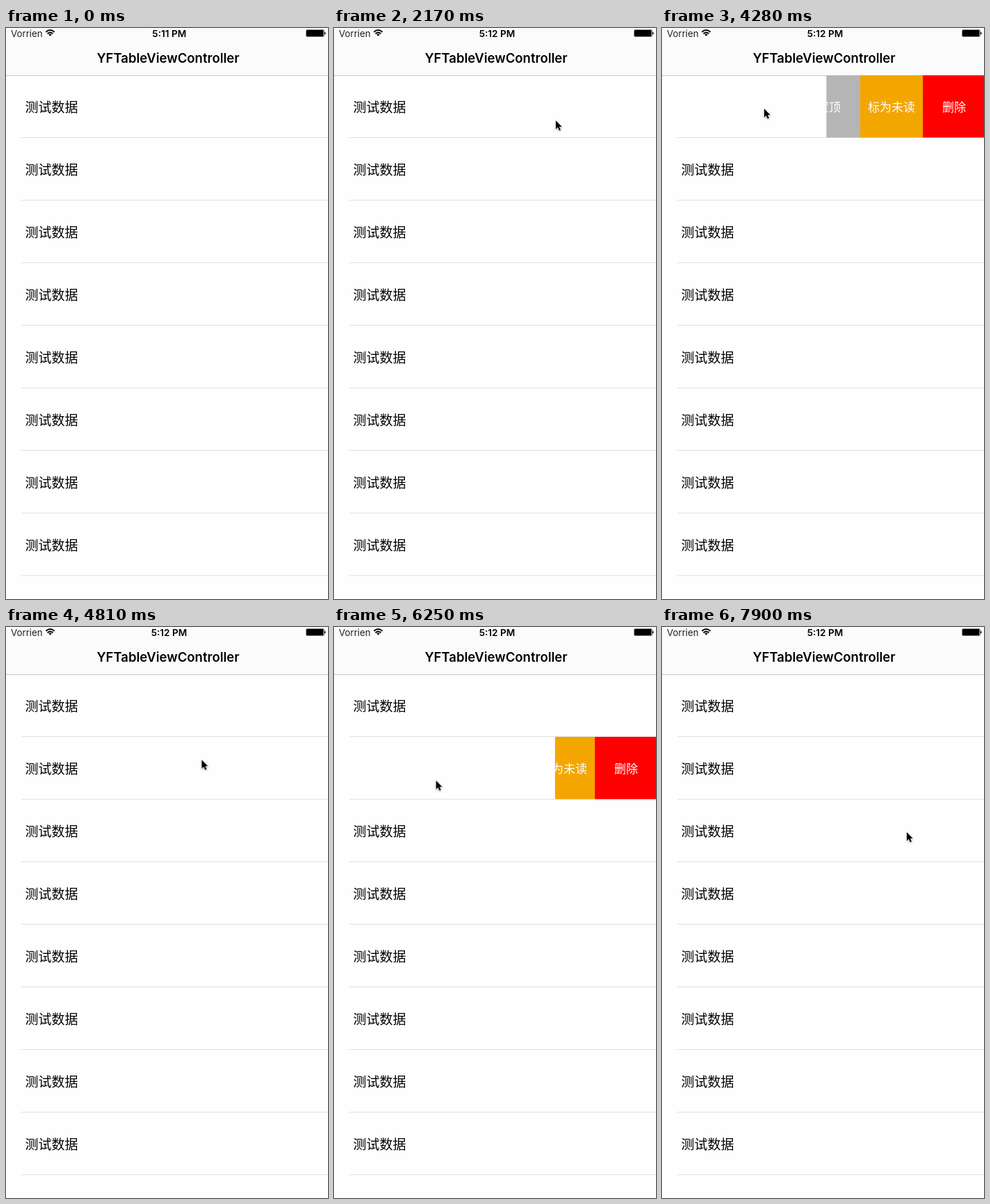
Animation, 463 px wide and 821 px high, one loop 8 s. Source, as an HTML page:

```html
<!DOCTYPE html>
<html lang="zh-CN">
<head>
<meta charset="utf-8">
<title>Swipe actions</title>
<style>
@property --x { syntax: "<length>"; inherits: true; initial-value: 0px; }

html, body { margin: 0; width: 100%; height: 100%; overflow: hidden; background: #fefefe; }
.stage {
  position: relative; width: 463px; height: 821px; overflow: hidden;
  background: #fefefe; color: #000;
  font-family: "Noto Sans CJK SC", "Noto Sans CJK", sans-serif; font-weight: 350;
}
.bar, .cursor { position: absolute; left: 0; top: 0; }
.bar { background: #fbfbfb; font-family: Inter, sans-serif; font-weight: 400; }

.rows { position: absolute; top: 68px; left: 0; right: 0; }
.row { position: relative; height: 90px; overflow: hidden; }
.row::before {
  content: ""; position: absolute; left: 22px; right: 0; bottom: 0;
  height: 1px; background: #e0e0e0;
}
.label {
  position: absolute; left: 27.5px; top: 0;
  font-size: 19px; line-height: 90px; white-space: nowrap;
  transform: translateX(var(--x));
}
.actions {
  position: absolute; inset: 0; display: flex; justify-content: flex-end;
  clip-path: inset(0 0 .5px calc(100% + var(--x)));
  color: #fff; font-size: 17px; line-height: 90px; text-align: center;
}
.actions span { flex: none; width: 90px; }
.pin { background: #b5b5b5; }
.unread { background: #f3a600; }
.actions .delete { width: 88px; background: #f00; text-indent: 2px; }

.row1 { animation: row1 8s infinite; }
.row2 { animation: row2 8s infinite; }
.row3 { animation: row3 8s linear infinite; }
.before { animation: old-minute 8s step-end infinite; }
.after { animation: new-minute 8s step-end infinite; }
.cursor { animation: cursor 8s linear infinite; }

@keyframes old-minute { 0% { opacity: 1 } 3.75%, 100% { opacity: 0 } }
@keyframes new-minute { 0% { opacity: 0 } 3.75%, 100% { opacity: 1 } }

@keyframes row1 {
  0%, 37% { --x: 0px; animation-timing-function: ease-in }
  39.125% { --x: -87px; animation-timing-function: ease-out }
  44.625%, 51.8% { --x: -268px; animation-timing-function: ease-in }
  53.5% { --x: -228px; animation-timing-function: ease-out }
  57%, 100% { --x: 0px }
}
@keyframes row2 {
  0%, 65% { --x: 0px; animation-timing-function: linear }
  65.3% { --x: -110px; animation-timing-function: linear }
  66.5% { --x: -235px; animation-timing-function: ease-out }
  71.5%, 75.6% { --x: -268px; animation-timing-function: ease-in }
  77.3% { --x: -228px; animation-timing-function: ease-out }
  80.8%, 100% { --x: 0px }
}
@keyframes row3 {
  0%, 86.4% { --x: 0px }
  88.75% { --x: -87.5px }
  91%, 92.5% { --x: -180px; animation-timing-function: ease-in-out }
  96.5%, 100% { --x: 0px }
}
@keyframes cursor {
  0% { opacity: 0; transform: translate(404px, 325px); animation-timing-function: step-end }
  6.375% { opacity: 1; transform: translate(404px, 325px) }
  9.125%, 10.8% { transform: translate(323px, 207px) }
  12.875%, 14.8% { transform: translate(323px, 170px) }
  17% { transform: translate(329px, 150px) }
  19.625%, 24% { transform: translate(318px, 134px) }
  24.125%, 26% { transform: translate(318px, 133px) }
  27.125%, 30% { transform: translate(318px, 132px) }
  31.5%, 34.2% { transform: translate(315px, 129px) }
  35.25%, 37% { transform: translate(315px, 126px) }
  39.125%, 52% { transform: translate(142px, 117px) }
  53.5%, 55.5% { transform: translate(146px, 115px) }
  61.5%, 62.8% { transform: translate(320px, 212px) }
  65.25%, 76% { transform: translate(141px, 215px) }
  80% { transform: translate(150px, 224px) }
  85.875%, 86.4% { transform: translate(320px, 283px) }
  88.75% { transform: translate(232px, 289px) }
  91%, 92.5% { transform: translate(150px, 292px); animation-timing-function: ease-in-out }
  96.5% { transform: translate(338px, 295px) }
  97.25% { transform: translate(341px, 294px) }
  98.75%, 100% { opacity: 1; transform: translate(351px, 294px) }
}
</style>
</head>
<body>
<div class="stage">
  <svg class="bar" width="463" height="69">
    <path d="M0 68.5H463" stroke="#c9c9c9"/>
    <text x="7" y="12.5" font-size="13.3" fill="#222">Vorrien</text>
    <g fill="none" stroke="#000" stroke-width="1.9">
      <path d="M57.4 5.7Q63.5 .2 69.6 5.7M59.6 8.2Q63.5 4.7 67.4 8.2"/>
      <path d="M61.2 9.3Q63.5 7.5 65.8 9.3L63.5 11.7Z" fill="#000" stroke="none"/>
    </g>
    <g font-size="13.6" font-weight="600" text-anchor="middle">
      <text class="before" x="234.8" y="12.5">5:11 PM</text>
      <text class="after" x="234.5" y="12.5">5:12 PM</text>
    </g>
    <rect x="431.5" y="2.5" width="26" height="10" rx="1.5" fill="none" stroke="#888"/>
    <rect x="432" y="3" width="24.5" height="9" rx="1"/>
    <path d="M458 5.5Q459.6 5.8 459.6 7.5T458 9.5Z"/>
    <text x="233" y="50" font-size="18.5" font-weight="600" text-anchor="middle">YFTableViewController</text>
  </svg>

  <div class="rows">
    <div class="row row1">
      <div class="label">测试数据</div>
      <div class="actions"><span class="pin">置顶</span><span class="unread">标为未读</span><span class="delete">删除</span></div>
    </div>
    <div class="row row2">
      <div class="label">测试数据</div>
      <div class="actions"><span class="pin">置顶</span><span class="unread">标为未读</span><span class="delete">删除</span></div>
    </div>
    <div class="row row3">
      <div class="label">测试数据</div>
      <div class="actions"><span class="pin">置顶</span><span class="unread">标为未读</span><span class="delete">删除</span></div>
    </div>
    <div class="row"><div class="label">测试数据</div></div>
    <div class="row"><div class="label">测试数据</div></div>
    <div class="row"><div class="label">测试数据</div></div>
    <div class="row"><div class="label">测试数据</div></div>
    <div class="row"><div class="label">测试数据</div></div>
  </div>

  <svg class="cursor" width="16" height="22" overflow="visible">
    <path d="M.5 .5V14L3.6 11.2 5.8 16.2 8.1 15.2 6 10.4H10Z" transform="translate(.5 .5) scale(.92)"
      stroke="#fff" stroke-width="1.2" paint-order="stroke"
      style="filter:drop-shadow(0 1px 1px #0005)"/>
  </svg>
</div>
</body>
</html>
```
